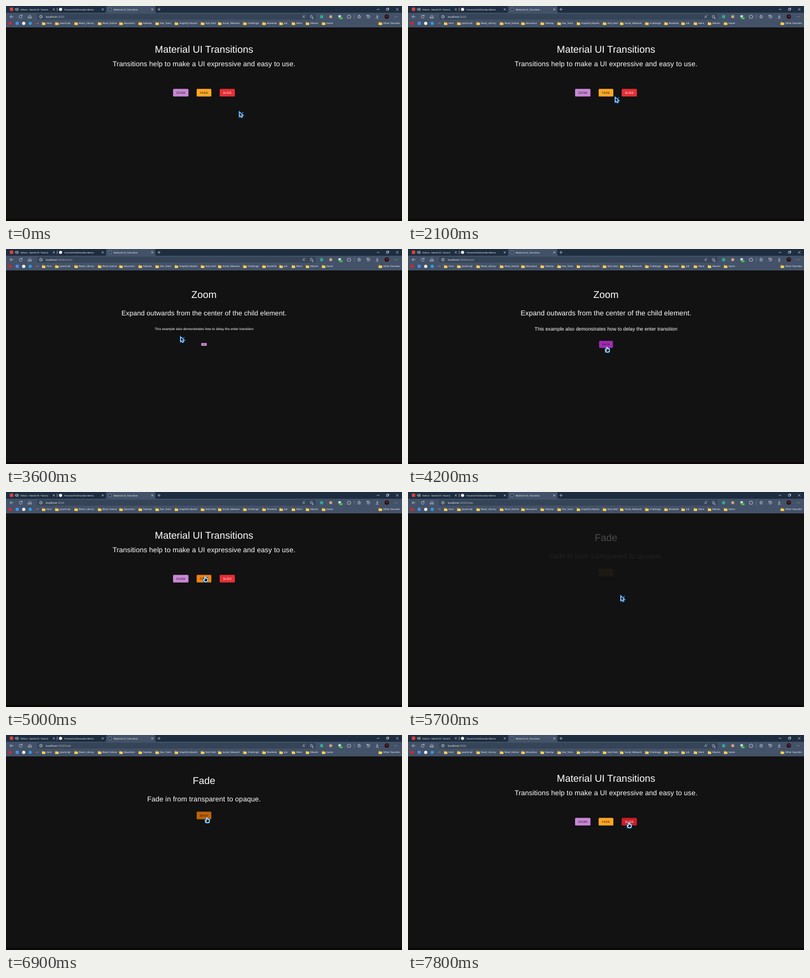
Animation of 704 by 382 pixels, one loop 8 s. Source, as an HTML page:

```html
<!DOCTYPE html>
<html lang="en">
<head>
<meta charset="utf-8">
<title>Material-UI_Transition</title>
<style>
  html, body { margin: 0; width: 100%; height: 100%; overflow: hidden; background: #121212; }
  svg { display: block; width: 100%; height: 100%; text-rendering: geometricPrecision; }
  text { fill: #fff; }
  .ui { font-family: "Open Sans", "Noto Sans", sans-serif; font-size: 4.3px; }
  .page { font-family: "Liberation Sans", Arial, sans-serif; text-anchor: middle; }
  .h3 { font-size: 17.6px; }
  .h4 { font-size: 12.47px; letter-spacing: .00735em; }
  .h5 { font-size: 8.8px; }
  .btn text { font-size: 5.13px; letter-spacing: .02857em; }
  .line { fill: none; stroke: #e4e9f0; stroke-width: .65; stroke-linecap: round; stroke-linejoin: round; }
</style>
</head>
<body>
<svg viewBox="0 0 704 382" preserveAspectRatio="none">
  <rect width="704" height="382" fill="#121212"/>
  <rect y="378.5" width="704" height="3.5" fill="#0b0709"/>

  <g class="ui">
    <rect width="704" height="14" fill="#1e2d40"/>
    <rect y="12" width="704" height="26" fill="#435268"/>
    <path d="M176 12q2 0 2-2V2q0-2 2-2h83.500q2 0 2 2v8q0 2 2 2z" fill="#435268"/>
    <rect x="55" y="13.700" width="495.500" height="10.600" rx="3.500" fill="#364458"/>

    <rect x="6.800" y="2.800" width="6" height="6" rx="1" fill="#e0403c"/>
    <circle cx="97" cy="6" r="2.800" fill="#f2f4f7"/>
    <circle cx="185" cy="6" r="2.600" fill="#24384c" stroke="#8fb4c8" stroke-width=".6"/>
    <g id="tabs" font-size="4.200"></g>
    <path class="line" d="M16.500 5v2h1l1.500 1.500v-5l-1.500 1.500zM20.300 4.600q1 1.400 0 2.800M21.500 3.700q1.800 2.300 0 4.600M91 3.500v5" />
    <path id="closers" class="line"/>
    <path class="line" d="M269.700 6h4.600M272 3.700v4.600M659.500 6h4M676.500 4.700h3v3h-3zM677.500 4.700v-1h3v3h-1M693.800 4.200l3.600 3.600m0-3.600l-3.600 3.600"/>

    <path class="line" d="M12.800 19H7.400m2.400-2.500L7.300 19l2.500 2.500M28.400 17.500a2.700 2.700 0 1 0 .4 2M28.700 15.800v2h-2M39.700 18.700l2.700-2.400 2.700 2.400v3h-1.800v-2h-1.800v2h-1.800z"/>
    <g class="line">
      <circle cx="62" cy="19" r="2.500"/><path d="M62 18.800v1.400M62 17.600v.1"/>
      <path d="M527.500 21l1.700-4.500 1.700 4.500M528.100 19.600h2.200M532 16v1.200" opacity=".65"/>
      <path d="M543 16.200l.8 1.700 1.900.2-1.400 1.300.4 1.900-1.700-.9-1.700.9.400-1.900-1.400-1.300 1.900-.2zM545.500 20.500v2.500m-1.200-1.200h2.500" opacity=".75"/>
      <path d="M607.500 17h1.500a1 1 0 0 1 2 0h1.200v1.400a1 1 0 0 1 0 2v1.300h-4.700z"/>
      <path d="M619.300 15.500v7" opacity=".35"/>
      <path d="M627.800 16.100l.9 1.900 2 .2-1.500 1.400.4 2-1.800-1-1.800 1 .4-2-1.500-1.400 2-.2z"/>
      <path d="M641.800 17.500a2.700 2.700 0 1 1-.3 2M641.500 16v1.700h1.700M644 17.400v1.800l1.300.5"/>
      <path d="M660 16v4m-1.600-1.600l1.600 1.600 1.600-1.600M657.800 21.800h4.400"/>
    </g>
    <rect x="558.600" y="16.300" width="5" height="5.400" rx="1.500" fill="#2fae98"/>
    <circle cx="577.300" cy="18.900" r="2.700" fill="#c7a878"/>
    <rect x="591" y="16.500" width="4.500" height="4" fill="#dce3ea"/>
    <rect x="592.500" y="19.600" width="6" height="3.900" rx=".8" fill="#2aa83c"/>
    <text x="593.300" y="22.700" font-size="3">On</text>
    <circle cx="677" cy="18.800" r="4" fill="#2b1216"/>
    <circle cx="677.500" cy="18" r="1.500" fill="#7a2b2b"/>
    <path d="M691.200 19h.1m2 0h.1m2 0h.1" class="line" stroke-width="1.100"/>
    <text x="70.500" y="20.700" font-size="4.900">localhost<tspan id="url" fill="#b3bdca"></tspan></text>

    <circle cx="7.300" cy="30.800" r="2.900" fill="#d8262c"/>
    <rect x="17.200" y="28" width="5.400" height="5.400" rx=".8" fill="#4b8ee8"/>
    <circle cx="31.500" cy="30.800" r="2.900" fill="#f2f4f7"/>
    <circle cx="43" cy="30.800" r="2.800" fill="#2e9fe0"/>
    <circle cx="53" cy="30.800" r=".9" fill="#c9545c"/>
    <text x="55.300" y="32.400" style="fill:#d9a0a6">8</text>
    <g id="marks"></g>
  </g>

  <g class="page" id="home">
    <text class="h3" x="352" y="83">Material UI Transitions</text>
    <text class="h4" x="352" y="106.900">Transitions help to make a UI expressive and easy to use.</text>
  </g>
  <g class="page" id="zoom">
    <g><text class="h3" x="352" y="87">Zoom</text></g>
    <g><text class="h4" x="352" y="118">Expand outwards from the center of the child element.</text></g>
    <g><text class="h5" x="352" y="145">This example also demonstrates how to delay the enter transition</text></g>
  </g>
  <g class="page" id="fade">
    <g><text class="h3" x="352" y="87">Fade</text></g>
    <g><text class="h4" x="352" y="118">Fade in from transparent to opaque.</text></g>
  </g>

  <g id="cursor">
    <g id="arrow">
      <path d="M1.500-1.800L4.200-4.500" stroke="#1688f0" stroke-width="1.500"/>
      <path d="M-2.500-4.500V3.500L-.6 1.900 1 4.800 2.600 4 1.200 1.300 3.600 1z" fill="#0a1726" stroke="#1688f0" stroke-width="2.600"/>
      <path d="M-2.500-4.500V3.500L-.6 1.900 1 4.800 2.600 4 1.200 1.300 3.600 1z" fill="#0a1726" stroke="#fff" stroke-width=".9"/>
    </g>
    <g id="hand">
      <rect x="-4.600" y="-4.600" width="9.200" height="9.600" rx="2" fill="#1480dc"/>
      <path d="M-1.500-4.500q1-.9 1.700 0v2.200q3-.3 3.400 2.300Q3.500 3.600 0 3.800-2.900 3.400-3.600.5q.6-1.400 2.100-.6z" fill="#0b1018" stroke="#fff" stroke-width="1.100"/>
    </g>
  </g>
</svg>

<script>
const LOOP = 8000, STEP = 100;
const $ = id => document.getElementById(id);

function add(parent, name, attrs, text) {
  const el = document.createElementNS("http://www.w3.org/2000/svg", name);
  for (const key in attrs) el.setAttribute(key, attrs[key]);
  if (text) el.textContent = text;
  parent.appendChild(el);
  return el;
}

// Browser chrome
const tabs = [
  [26, "Kelvra - Nomil (Ft. Torani)"],
  [104, "Farvend Kolshandar/demo"],
  [191.5, "Material-UI_Transition"]
];
for (const [x, title] of tabs) add($("tabs"), "text", { x, y: 7.5 }, title);
$("closers").setAttribute("d", [85, 172, 260].map(x => `M${x - 1.5} 4.500l3 3m0-3l-3 3`).join(""));

const marks = [
  [64, "Host"], [87.5, "JavaScript"], [121.7, "React_Library"], [163.5, "React_Native"],
  [201.5, "Education"], [235.7, "FakeApi"], [265.7, "Dev_Tools"], [300, "GraphQL/Apollo"],
  [346.5, "Kod_Nest"], [377, "Social_Network"], [421.7, "Challenge"], [455.7, "Mavikelo"],
  [486, "Job"], [508, "More"], [533, "Moveis"], [561.7, "Game"], [662.5, "Other favorites"]
];
for (const [x, label] of marks) {
  add($("marks"), "path", { d: `M${x} 28.500h2.300l.8.800h2.900v4.200h-6z`, fill: "#e0a92e" });
  add($("marks"), "path", { d: `M${x} 30.300h6v3.200h-6z`, fill: "#ffd75e" });
  add($("marks"), "text", { x: x + 7.9, y: 32.3 }, label);
}

// Buttons
function button(page, label, x, y, w, fill, hover, ink = "#1c1512") {
  const h = 13.4;
  const g = add($(page), "g", { class: "btn" });
  const rect = add(g, "rect", { x: x - w / 2, y: y - h / 2, width: w, height: h, rx: 1.5 });
  add(g, "text", { x: x + .1, y: y + 1.9, style: `fill:${ink}` }, label);
  return { page, g, rect, x, y, w, h, fill, hover };
}
const buttons = [
  button("home", "ZOOM", 310.7, 154, 27.4, "#c987d6", "#a933bb"),
  button("home", "FADE", 352, 154, 26.2, "#ffa726", "#f0800c"),
  button("home", "SLIDE", 393.4, 154, 27, "#e62f36", "#cc1e28", "#fff"),
  button("zoom", "BACK", 352, 169.5, 26.2, "#c987d6", "#a32bb6"),
  button("fade", "BACK", 352, 143, 26.2, "#ffa726", "#bd640b")
];

// Timeline
const pages = [
  [0, "home", ":3000"], [3100, "zoom", ":3000/zoom"], [4500, "home", ":3000"],
  [5500, "fade", ":3000/fade"], [7200, "home", ":3000"]
];
const path = [
  [0, 417.5, 193], [1500, 417.5, 193], [2100, 371, 167], [2400, 337, 153], [2800, 313, 161],
  [3700, 313, 161], [4200, 354.5, 179.5], [4400, 354.5, 179.5], [4800, 356, 155], [5400, 353, 157],
  [5700, 381, 189.5], [5900, 385, 198], [6300, 384, 199], [6700, 358, 152], [7200, 358, 152],
  [7700, 393.5, 161], [8000, 393.5, 161]
];
const zoomStart = 3140, zoomTimes = [350, 595, 1040, 1520], zoomY = [81, 113.5, 142, 169.5];
const fadeStart = 5500, fadeTimes = [800, 1380, 1500];

// cubic-bezier(.4, 0, .2, 1)
function ease(p) {
  if (p <= 0) return 0;
  if (p >= 1) return 1;
  let lo = 0, hi = 1;
  for (let i = 0; i < 20; i++) {
    const s = (lo + hi) / 2, r = 1 - s;
    if (1.2 * s * r * r + .6 * s * s * r + s ** 3 < p) lo = s; else hi = s;
  }
  return lo * lo * (3 - 2 * lo);
}

function pointAt(t) {
  const i = path.findIndex(p => p[0] > t);
  const [t0, x0, y0] = path[i - 1], [t1, x1, y1] = path[i];
  const k = (t - t0) / (t1 - t0);
  return [x0 + (x1 - x0) * k, y0 + (y1 - y0) * k];
}

function draw(t) {
  const [, page, url] = pages.filter(p => p[0] <= t).pop();
  for (const id of ["home", "zoom", "fade"]) $(id).style.display = id === page ? "" : "none";
  $("url").textContent = url;

  [...$("zoom").children].forEach((el, i) => {
    const s = ease((t - zoomStart) / zoomTimes[i]), y = zoomY[i];
    el.setAttribute("transform", `translate(352 ${y}) scale(${s}) translate(-352 ${-y})`);
  });
  [...$("fade").children].forEach((el, i) => {
    el.setAttribute("opacity", ease((t - fadeStart) / fadeTimes[i]));
  });

  const [x, y] = pointAt(t);
  let over = false;
  for (const b of buttons) {
    const on = b.page === page && Math.abs(x - 1.5 - b.x) < b.w / 2 && Math.abs(y - 5 - b.y) < b.h / 2;
    b.rect.setAttribute("fill", on ? b.hover : b.fill);
    over = over || on;
  }
  $("cursor").setAttribute("transform", `translate(${x} ${y})`);
  $("hand").style.display = over ? "" : "none";
  $("arrow").style.display = over ? "none" : "";
}

const start = performance.now();
function tick() {
  const t = (performance.now() - start) % LOOP;
  draw(Math.floor(t / STEP) * STEP);
  requestAnimationFrame(tick);
}
tick();
</script>
</body>
</html>
```
